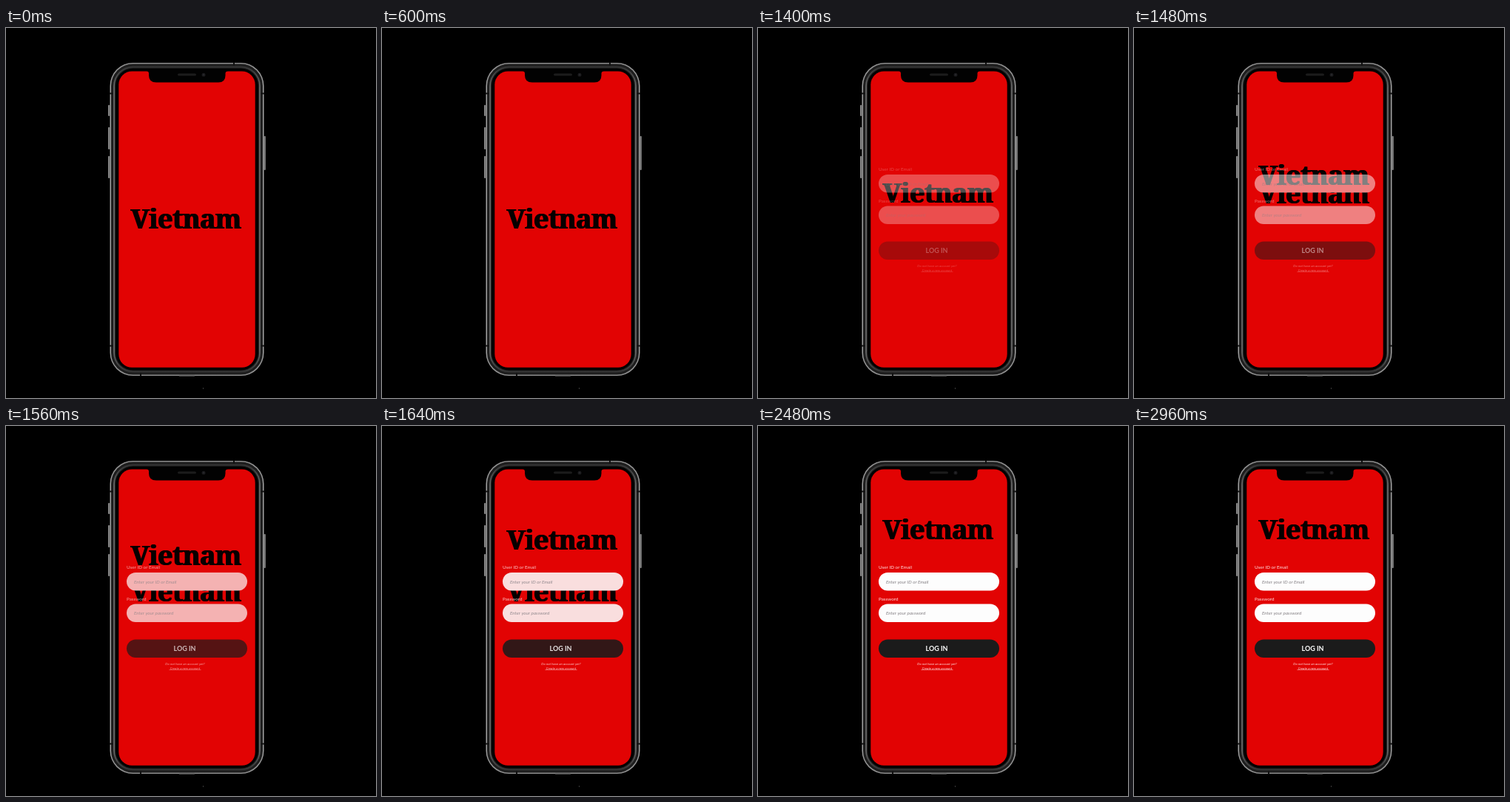
An HTML page with a canvas that plays this animation: 500 by 500 pixels, repeating every 3 s.

```html
<!DOCTYPE html>
<html lang="en">
<head>
<meta charset="utf-8">
<title>Login screen</title>
<style>
html, body { margin: 0; width: 100%; height: 100%; overflow: hidden; background: #000; }
canvas { display: block; width: 500px; height: 500px; }
</style>
</head>
<body>
<canvas id="stage"></canvas>
<script>
const LOOP = 3000, STEP = 40;
const MOVE = { start: 1240, hold: 1360, end: 1720 };
const TITLE_FROM = 271, TITLE_TO = 153;
const RED = '#e20303';
const SANS = 'Lato, "Open Sans", sans-serif';
const TITLE_FONT = '900 36px "Noto Serif", serif';

const canvas = document.getElementById('stage');
const ctx = canvas.getContext('2d');
const dpr = window.devicePixelRatio || 1;
canvas.width = canvas.height = 500 * dpr;
ctx.scale(dpr, dpr);

function box(x, y, w, h, r, fill) {
  ctx.beginPath();
  ctx.roundRect(x, y, w, h, r);
  ctx.fillStyle = fill;
  ctx.fill();
}

function label(str, x, y, font, fill, align = 'left') {
  ctx.font = font + ' ' + SANS;
  ctx.textAlign = align;
  ctx.fillStyle = fill;
  ctx.fillText(str, x, y);
}

// bright along the sides, different tone at the top and bottom edges
function metal(ends, sides) {
  const g = ctx.createLinearGradient(0, 47, 0, 470);
  g.addColorStop(0, ends);
  g.addColorStop(0.08, sides);
  g.addColorStop(0.92, sides);
  g.addColorStop(1, ends);
  return g;
}

function drawButtons() {
  for (const [x, y, h] of [[138, 104, 15], [138, 134, 30], [138, 173, 30], [348.5, 146, 46]]) {
    box(x, y, 2.3, h, 1, '#868686');
  }
}

function drawFrame() {
  const layers = [
    [0, metal('#8c8c8c', '#a2a2a2')],
    [1.5, '#1e1e1e'],
    [4.7, metal('#2c2c2c', '#6e6e6e')],
    [6.3, '#262626'],
    [7.5, '#020202']
  ];
  for (const [d, fill] of layers) {
    box(140.5 + d, 47 + d, 208 - 2 * d, 423 - 2 * d, 31 - d, fill);
  }
  // antenna bands
  for (const y of [87.5, 428.5]) {
    box(140, y, 4.5, 2, 0, '#101010');
    box(344.5, y, 4.5, 2, 0, '#101010');
  }
  box(307, 46.5, 2, 4, 0, '#101010');
  box(181, 466.5, 2, 4, 0, '#101010');
  box(234, 469.5, 21, 1.5, 0.5, '#444');
}

function drawScreen() {
  box(152.3, 58.5, 184.4, 400.3, 18, RED);
  // notch with flared shoulders
  ctx.beginPath();
  ctx.moveTo(190, 58);
  ctx.quadraticCurveTo(193, 58.5, 193, 61.5);
  ctx.lineTo(193, 64);
  ctx.quadraticCurveTo(193, 73.5, 203, 73.5);
  ctx.lineTo(287, 73.5);
  ctx.quadraticCurveTo(296.5, 73.5, 296.5, 64);
  ctx.lineTo(296.5, 61.5);
  ctx.quadraticCurveTo(296.5, 58.5, 300, 58);
  ctx.fillStyle = '#020202';
  ctx.fill();
  box(232, 61.5, 25, 3, 1.5, '#1c1c1c');
  box(264.5, 60.7, 5, 5, 2.5, '#1a1a1c');
  box(266, 62.2, 2, 2, 1, '#2b2b30');
}

// two shifted passes fatten the stems and keep the hairlines thin
function drawTitle(y) {
  const word = 'Vietnam', left = 168, width = 151, fat = 1.4;
  ctx.font = TITLE_FONT;
  ctx.textAlign = 'left';
  ctx.letterSpacing = '0px';
  const tracking = (width - fat - ctx.measureText(word).width) / (word.length - 1);
  ctx.letterSpacing = tracking + 'px';
  ctx.fillStyle = '#050000';
  ctx.fillText(word, left, y);
  ctx.fillText(word, left + fat, y);
  ctx.letterSpacing = '0px';
}

// the title leaves a strip behind between the two fields
function drawTrail() {
  ctx.save();
  ctx.beginPath();
  ctx.rect(163, 222, 163, 18);
  ctx.clip();
  drawTitle(237);
  ctx.restore();
}

function drawForm(alpha) {
  ctx.globalAlpha = alpha;
  const pale = '#ffe4e4', hint = '#858085';
  label('User ID or Email', 163, 193, '6.3px', pale);
  box(163, 198, 163, 24.5, 12.25, '#fdfdfd');
  label('Enter your ID or Email', 173, 213, 'italic 6.3px', hint);
  label('Password', 163, 235.5, '6.3px', pale);
  box(163, 240.5, 163, 24.5, 12.25, '#fdfdfd');
  label('Enter your password', 173, 255.3, 'italic 6.3px', hint);
  box(163, 288.5, 163, 24.5, 12.25, '#1b1b1b');
  label('LOG IN', 241.5, 303.7, 'bold 9px', '#fff', 'center');
  label('Do not have an account yet?', 242, 323.3, 'italic 4.5px', pale, 'center');
  label('Create a new account', 242, 328.8, 'italic 4.5px', pale, 'center');
  box(220.5, 329.4, 43, 0.5, 0, pale);
  ctx.globalAlpha = 1;
}

function progress(t) {
  if (t < MOVE.hold) return 0;
  const u = Math.min(1, (t - MOVE.start) / (MOVE.end - MOVE.start));
  const smooth = u * u * (3 - 2 * u);
  return (u + smooth) / 2;
}

function render(ms) {
  const t = Math.floor((ms % LOOP) / STEP) * STEP;
  const p = progress(t);
  ctx.fillStyle = '#000';
  ctx.fillRect(0, 0, 500, 500);
  drawButtons();
  drawFrame();
  drawScreen();
  box(266, 486.5, 1, 1, 0, '#777');
  if (t > 1400 && t < MOVE.end) drawTrail();
  drawTitle(TITLE_FROM + (TITLE_TO - TITLE_FROM) * p);
  if (p > 0) drawForm(p);
}

const origin = performance.now();
function tick() {
  render(performance.now() - origin);
  requestAnimationFrame(tick);
}
tick();
</script>
</body>
</html>
```
